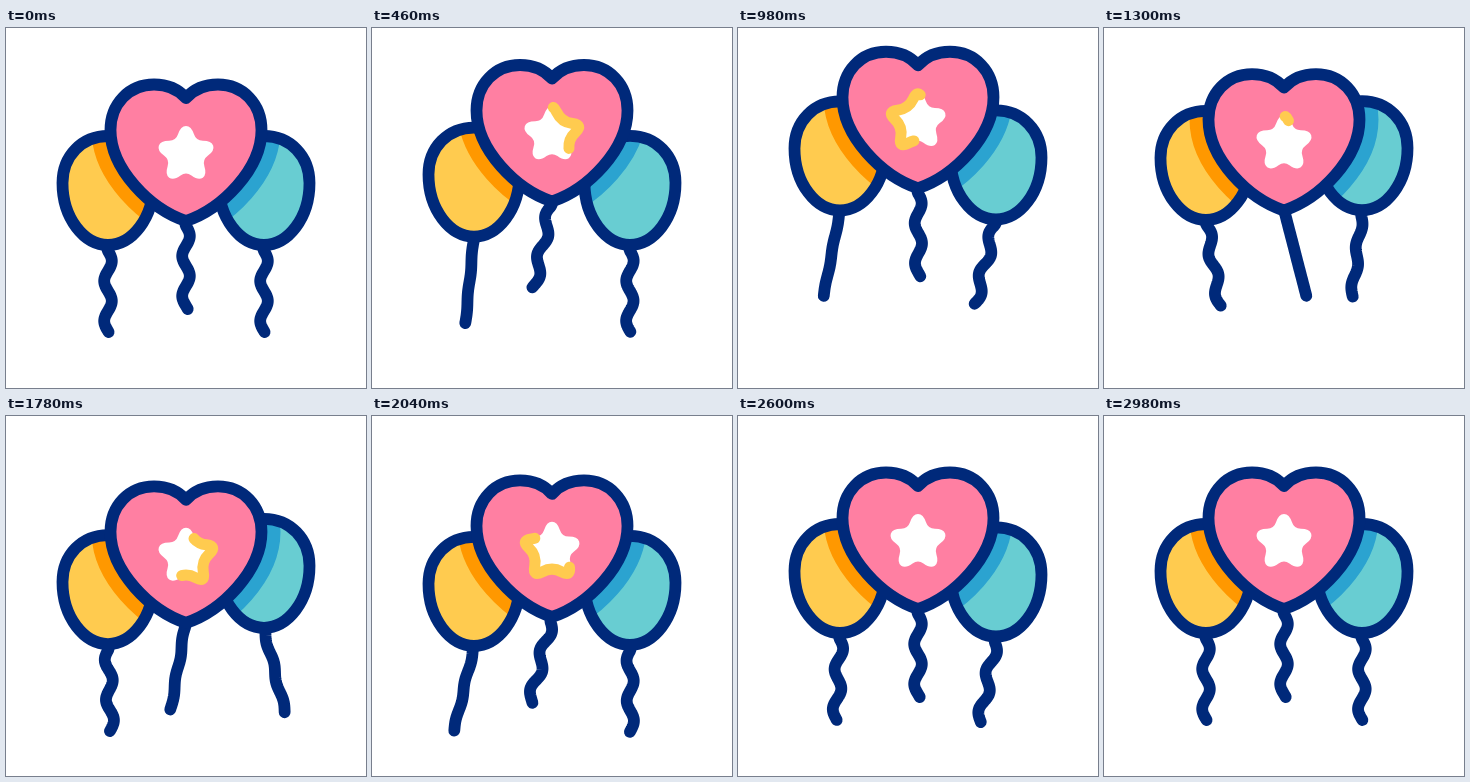
These frames come from a looping animation (360 by 360 pixels, 3000 ms). An HTML page:

```html
<!DOCTYPE html>
<html lang="en">
<head>
<meta charset="utf-8">
<title>Balloons</title>
<style>
  html, body { margin: 0; width: 100%; height: 100%; overflow: hidden; background: #fff; }
  svg { display: block; width: 100vw; height: 100vh; }
  path, use { stroke-linecap: round; stroke-linejoin: round; }
  .line { fill: none; stroke: #00297a; stroke-width: 11.8; }
  .shade { stroke-width: 38; }
</style>
</head>
<body>
<svg viewBox="0 0 360 360">
  <defs>
    <path id="egg" d="M102 108C76 108 56.5 128 56.5 155C56.5 190 78 217 102 217S147.5 190 147.5 155C147.5 128 128 108 102 108Z"/>
    <path id="heart" d="M180 70C172 61 160 56.5 148 56.5C123 56.5 104.5 76 104.5 102C104.5 141 144 181 180 193C216 181 255.5 141 255.5 102C255.5 76 237 56.5 212 56.5C200 56.5 188 61 180 70Z"/>
    <clipPath id="inside"><use href="#egg"/></clipPath>
  </defs>
  <g id="strings"></g>
  <g id="left">
    <use href="#egg" fill="#ffcb4f"/>
    <g clip-path="url(#inside)"><use class="shade" href="#heart" fill="#ff9800" stroke="#ff9800"/></g>
    <use href="#egg" class="line"/>
  </g>
  <g id="right">
    <g transform="matrix(-1 0 0 1 360 0)">
      <use href="#egg" fill="#68cdd2"/>
      <g clip-path="url(#inside)"><use class="shade" href="#heart" fill="#2ba3d0" stroke="#2ba3d0"/></g>
      <use href="#egg" class="line"/>
    </g>
  </g>
  <g id="middle">
    <use href="#heart" fill="#ff7fa2"/>
    <use href="#heart" class="line"/>
    <path id="star" fill="#fff" stroke="#fff" stroke-width="10"/>
    <path id="glint" pathLength="2" fill="none" stroke="#ffcb4f" stroke-width="11"/>
  </g>
</svg>
<script>
const LOOP = 3000;
const $ = id => document.getElementById(id);
const clamp = p => Math.min(1, Math.max(0, p));
const ease = p => (1 - Math.cos(Math.PI * clamp(p))) / 2;

// Float up, sink past the start, settle
const rise = t => -35 * ease(t / 860) + 49 * ease((t - 860) / 880) - 14 * ease((t - 1740) / 660);

// String angle: out, across, back, rest
const swing = t => 14.5 * [1, -2, 2, -1].reduce((sum, k, i) => sum + k * ease(t / 650 - i), 0);

// String waviness: two full cycles, then still
const wave = t => Math.cos(2 * Math.PI * 2 * clamp(t / 2080));

const balloons = [
  { id: 'left', x: 102, y: 217, len: 87, delay: 180 },
  { id: 'right', x: 258, y: 217, len: 87, delay: 420 },
  { id: 'middle', x: 180, y: 192, len: 89, delay: 0 }
];

for (const b of balloons) {
  b.group = $(b.id);
  b.shade = b.group.querySelector('.shade');
  b.string = document.createElementNS('http://www.w3.org/2000/svg', 'path');
  b.string.setAttribute('class', 'line');
  $('strings').append(b.string);
}

// Rounded star: corners are control points between edge midpoints
function starPath(outer, inner, laps) {
  const corner = i => {
    const r = i % 2 ? inner : outer, a = i * Math.PI / 5;
    return [180 + r * Math.sin(a), 126.5 - r * Math.cos(a)];
  };
  const middle = i => {
    const [a, b] = [corner(i), corner(i + 1)];
    return [(a[0] + b[0]) / 2, (a[1] + b[1]) / 2];
  };
  let d = 'M' + middle(9);
  for (let i = 0; i < 10 * laps; i++) d += `Q${corner(i)} ${middle(i)}`;
  return d;
}
$('star').setAttribute('d', starPath(28.5, 11, 1));
$('glint').setAttribute('d', starPath(33, 16, 2));

function stringPath(len, amp) {
  const pts = [];
  for (let s = 0; s <= len; s++) {
    const x = amp * clamp(s / 8) * Math.sin((s - 6) / 40 * 2 * Math.PI);
    pts.push(x.toFixed(2) + ' ' + s);
  }
  return 'M' + pts.join('L');
}

// Yellow stroke runs once round the star, twice per loop
function drawGlint(t) {
  const local = t < 1380 ? t - 200 : t - 1380;
  const head = 1.03 * clamp(local / 800);
  const tail = 1.03 * clamp((local - 300) / 820) ** 1.3;
  const glint = $('glint');
  glint.style.display = head > tail ? '' : 'none';
  glint.setAttribute('stroke-dasharray', `${head - tail} 9`);
  glint.setAttribute('stroke-dashoffset', -tail - .05);
}

function draw(t) {
  for (const b of balloons) {
    const local = t - b.delay, y = rise(local);
    b.group.setAttribute('transform', `translate(0 ${y})`);
    if (b.shade) b.shade.setAttribute('transform', `translate(0 ${rise(t) - y})`);
    b.string.setAttribute('d', stringPath(b.len, 3.8 * wave(local)));
    b.string.setAttribute('transform', `translate(${b.x} ${b.y + y}) rotate(${swing(local)})`);
  }
  drawGlint(t);
}

const start = performance.now();
function tick(now) {
  draw(Math.max(0, now - start) % LOOP);
  requestAnimationFrame(tick);
}
draw(0);
requestAnimationFrame(tick);
</script>
</body>
</html>
```
